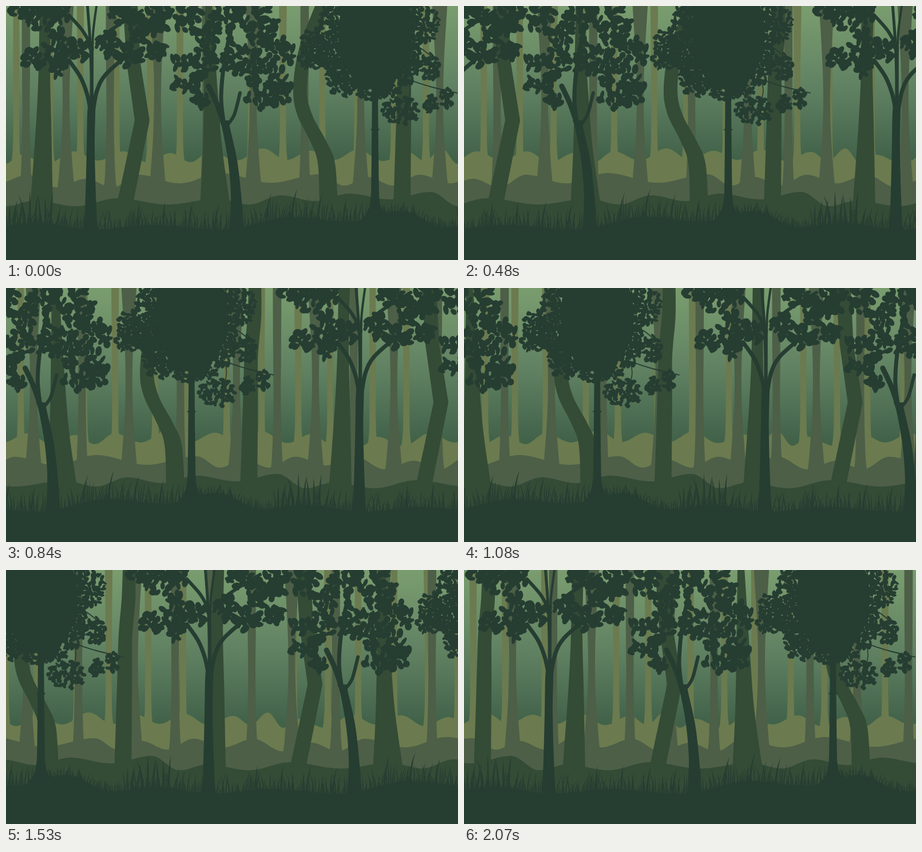
An HTML page for the animation above (2.1 s loop, 790 by 444 pixels).

```html
<!DOCTYPE html>
<html lang="en">
<head>
<meta charset="utf-8">
<title>Forest</title>
<style>
html, body { margin: 0; width: 100%; height: 100%; overflow: hidden; background: #263d32; }
svg { display: block; width: 100vw; height: 100vh; }
</style>
</head>
<body>
<svg id="stage" viewBox="0 0 790 444" preserveAspectRatio="none">
  <defs>
    <linearGradient id="sky" x1="0" y1="0" x2="0" y2="268" gradientUnits="userSpaceOnUse">
      <stop offset="0" stop-color="#7a9d6f"/>
      <stop offset=".5" stop-color="#628363"/>
      <stop offset="1" stop-color="#416249"/>
    </linearGradient>
  </defs>
  <rect width="790" height="444" fill="url(#sky)"/>
</svg>
<script>
const W = 790, H = 444, STEP = 30, STEPS = 70;
const GOLDEN = Math.PI * (3 - Math.sqrt(5));
const stage = document.getElementById('stage');

let seed = 11;
const rnd = () => (seed = (seed * 16807) % 2147483647) / 2147483647;
const spread = (a, b) => a + (b - a) * rnd();
const n = v => v.toFixed(1);
const range = (count, f) => Array.from({ length: count }, (_, i) => f(i));

function add(parent, tag, attrs) {
  const el = document.createElementNS('http://www.w3.org/2000/svg', tag);
  for (const key in attrs) el.setAttribute(key, attrs[key]);
  return parent.appendChild(el);
}

const straight = pts => pts.map(p => p.map(n).join()).join(' L');

// Catmull-Rom spline through the points
function smooth(pts) {
  let d = pts[0].map(n).join();
  for (let i = 0; i < pts.length - 1; i++) {
    const [a, b, c, e] = [pts[i - 1] || pts[i], pts[i], pts[i + 1], pts[i + 2] || pts[i + 1]];
    d += ` C${n(b[0] + (c[0] - a[0]) / 6)},${n(b[1] + (c[1] - a[1]) / 6)}` +
      ` ${n(c[0] - (e[0] - b[0]) / 6)},${n(c[1] - (e[1] - b[1]) / 6)} ${n(c[0])},${n(c[1])}`;
  }
  return d;
}

// Trunk around a spine of [x, y, half width]
function trunk(spine, line = smooth) {
  const side = s => spine.map(([x, y, half]) => [x + s * half, y]);
  return `M${line(side(-1))} L${line(side(1).reverse())}Z`;
}

// Periodic contour: cosine waves between peaks, dipping midway by `drop`
function ridge(peaks, drop) {
  const tops = [-W, 0, W].flatMap(by => peaks.map(([x, y]) => [x + by, y]));
  return x => {
    const i = tops.findIndex(p => p[0] > x);
    const [[ax, ay], [bx, by]] = [tops[i - 1], tops[i]];
    const t = (x - ax) / (bx - ax), low = Math.max(ay, by) + drop;
    const top = t < .5 ? ay : by;
    return top + (low - top) * (1 - Math.cos(2 * Math.PI * t)) / 2;
  };
}
const hill = height =>
  `M-2,${H} L${straight(range(200, i => [i * 4 - 2, height(i * 4 - 2)]))} L${W + 4},${H}Z`;

function ellipse(x, y, rx, ry, turn = 0) {
  const dx = rx * Math.cos(turn), dy = rx * Math.sin(turn);
  const arc = s => `a${n(rx)},${n(ry)} ${n(turn * 180 / Math.PI)} 1 1 ${n(s * dx)},${n(s * dy)}`;
  return `M${n(x - dx)},${n(y - dy)}${arc(2)}${arc(-2)}Z`;
}

// Leaves spread over an ellipse in sunflower order
const leaves = (size, density) => ([x, y, rx, ry]) => {
  const count = Math.ceil(density * rx * ry / (size * size * .6));
  return range(count, i => {
    const r = Math.sqrt((i + .5) / count), a = i * GOLDEN + spread(-.5, .5);
    return ellipse(x + (rx - size * .7) * r * Math.cos(a), y + (ry - size * .7) * r * Math.sin(a),
      size * spread(.7, 1.2), size * spread(.4, .75), spread(0, Math.PI));
  }).join('');
};

const layers = [];
function layer(color, travel, shapes, branches = []) {
  const group = add(stage, 'g', { fill: color });
  const tile = add(group, 'g', { id: 'tile' + layers.length });
  for (const d of shapes) add(tile, 'path', { d });
  for (const [width, ...pts] of branches)
    add(tile, 'path', { d: 'M' + smooth(pts), fill: 'none', stroke: color,
      'stroke-width': width, 'stroke-linecap': 'round' });
  add(group, 'use', { href: '#' + tile.id, x: W });
  layers.push({ group, travel });
}

const farTrunks = [18, 77, 130, 193, 252, 304, 358, 428, 484, 553, 614, 678, 734].map(x => {
  const top = spread(5.5, 8);
  return trunk([[x, -5, top], [x, 120, 5.5], [x, 225, 5.5], [x, 262, 7], [x, 290, 11]]);
});
const farRidge = ridge([[26, 260], [118, 254], [205, 254], [288, 257], [357, 254], [449, 249],
  [532, 253], [615, 251], [702, 255], [762, 249]], 16);
layer('#6b7b4f', 412, [...farTrunks, hill(farRidge)]);

// Slender and stout trunks take turns
const midTrunks = [35, 105, 182, 265, 350, 432, 522, 620, 691, 758].map((x, i) => {
  const stout = i % 2, base = stout ? 12.5 : 9;
  return trunk([[x, -5, stout ? 13.5 : 7.5], [x, 110, 7], [x, 200, 6.5], [x, 295, base], [x, 325, base + 4]]);
});
const midRidge = ridge([[38, 295], [140, 302], [232, 295], [375, 292], [550, 294], [632, 299], [723, 295]], 15);
layer('#4d5f47', 535, [...midTrunks, hill(midRidge)]);

const nearRidge = ridge([[50, 340], [195, 336], [370, 337], [480, 331], [600, 328], [742, 325]], 10);
layer('#344b36', 660, [
  trunk([[69, -5, 10], [67, 110, 10], [66, 200, 13], [62, 355, 20]]),
  trunk([[217, -5, 13], [223, 100, 12], [238, 200, 13], [206, 355, 14]], straight),
  trunk([[354, -5, 6], [358, 150, 12], [361, 250, 17], [366, 355, 27]]),
  trunk([[555, -5, 13], [524, 75, 12], [514, 145, 12], [522, 190, 13], [545, 235, 14], [560, 275, 15], [564, 355, 16]]),
  trunk([[703, -5, 11], [702, 50, 12], [698, 95, 12], [696, 130, 12], [695, 200, 13], [692, 355, 15]]),
  hill(nearRidge)
]);

const soil = ridge([[55, 379], [255, 383], [500, 369], [690, 359]], 8);

function blade(x, height, lean, w) {
  const y = soil(x) + 5, top = y - 5 - height, bend = y - height * .6;
  return `M${n(x - w)},${n(y)} Q${n(x - w)},${n(bend)} ${n(x + lean)},${n(top)}` +
    ` Q${n(x + w)},${n(bend)} ${n(x + w)},${n(y)}Z`;
}
// Short dense turf on the right, long blades elsewhere, a few tall ones at the left
function grass() {
  let d = '';
  for (let x = 2; x < W - 2; x += x > 655 ? 2.4 : 3.2) {
    const height = x > 655 ? spread(8, 20) : spread(8, 38);
    d += blade(x, height, spread(-9, 9), 1.2);
  }
  for (let x = 6; x < 80; x += 9) d += blade(x, spread(38, 62), spread(-12, 8), 2);
  for (let x = 230; x < 630; x += 45) d += blade(x, spread(38, 52), spread(2, 10), 2);
  return d;
}

const roundCrown = [
  [28, 5, 28, 24], [62, 12, 40, 36], [95, 8, 22, 30], [50, 92, 28, 24], [93, 66, 33, 32],
  [92, 102, 22, 26], [130, 76, 28, 25], [180, 66, 27, 28], [216, 84, 30, 27], [262, 78, 27, 20],
  [205, 12, 30, 28], [240, 40, 34, 30], [268, 18, 28, 34]
].map(leaves(8, 1.05));

const broadCrown = [
  [318, 20, 30, 34], [350, 55, 30, 38], [310, 98, 26, 21], [345, 102, 30, 34], [315, 138, 33, 20],
  [340, 162, 20, 22], [388, 20, 36, 34], [395, 88, 26, 40], [440, 28, 40, 48], [428, 98, 27, 38],
  [466, 82, 42, 42], [448, 150, 38, 38], [482, 145, 22, 34]
].map(leaves(8, .85));

const fineCrown = [
  [635, 55, 95, 108], [534, 68, 24, 30], [536, 95, 30, 18], [575, 60, 40, 60], [588, 125, 32, 38],
  [650, 138, 48, 32], [728, 30, 32, 38], [690, 183, 36, 28], [743, 172, 16, 19], [771, 161, 16, 21],
  [741, 106, 20, 28], [700, 95, 28, 45]
].map(leaves(4.8, 1.05));

layer('#263d32', W, [
  trunk([[150, 170, 6], [149, 190, 7], [148, 250, 7], [148, 330, 9], [148, 380, 11.5], [148, 400, 16]]),
  trunk([[381, 200, 8], [385, 215, 7], [396, 270, 8], [402, 330, 9], [403, 380, 12], [404, 400, 15]]),
  trunk([[645, 140, 5], [645, 300, 6.5], [645, 340, 8], [645, 358, 13], [645, 375, 23]]),
  ...roundCrown, ...broadCrown, ...fineCrown,
  ellipse(645, 48, 64, 98), ellipse(645, 216, 8, 2),
  grass(), hill(soil)
], [
  [7, [148, 186], [142, 155], [130, 124], [110, 95]],
  [5, [149, 180], [149, 120], [147, 62], [142, -6]],
  [4, [151, 180], [151, 110], [152, 50], [159, -6]],
  [7, [152, 185], [159, 148], [174, 120], [212, 86]],
  [6, [147, 66], [133, 42], [110, 16]],
  [6, [158, 72], [168, 55], [195, 34], [238, 8]],
  [9, [382, 210], [369, 172], [354, 140]],
  [7, [381, 208], [376, 160], [382, 95], [396, 30]],
  [6, [386, 209], [399, 190], [409, 152]],
  [2, [695, 126], [742, 141], [788, 152]],
  [1.6, [704, 130], [706, 148], [704, 162]],
  [2, [712, 68], [728, 76], [748, 92]]
]);

function draw(now) {
  const progress = Math.floor(now / STEP) % STEPS / (STEPS - 1);
  for (const { group, travel } of layers)
    group.setAttribute('transform', `translate(${n(-travel * progress)} 0)`);
}

const start = performance.now();
function tick() {
  draw(performance.now() - start);
  requestAnimationFrame(tick);
}
tick();
</script>
</body>
</html>
```
